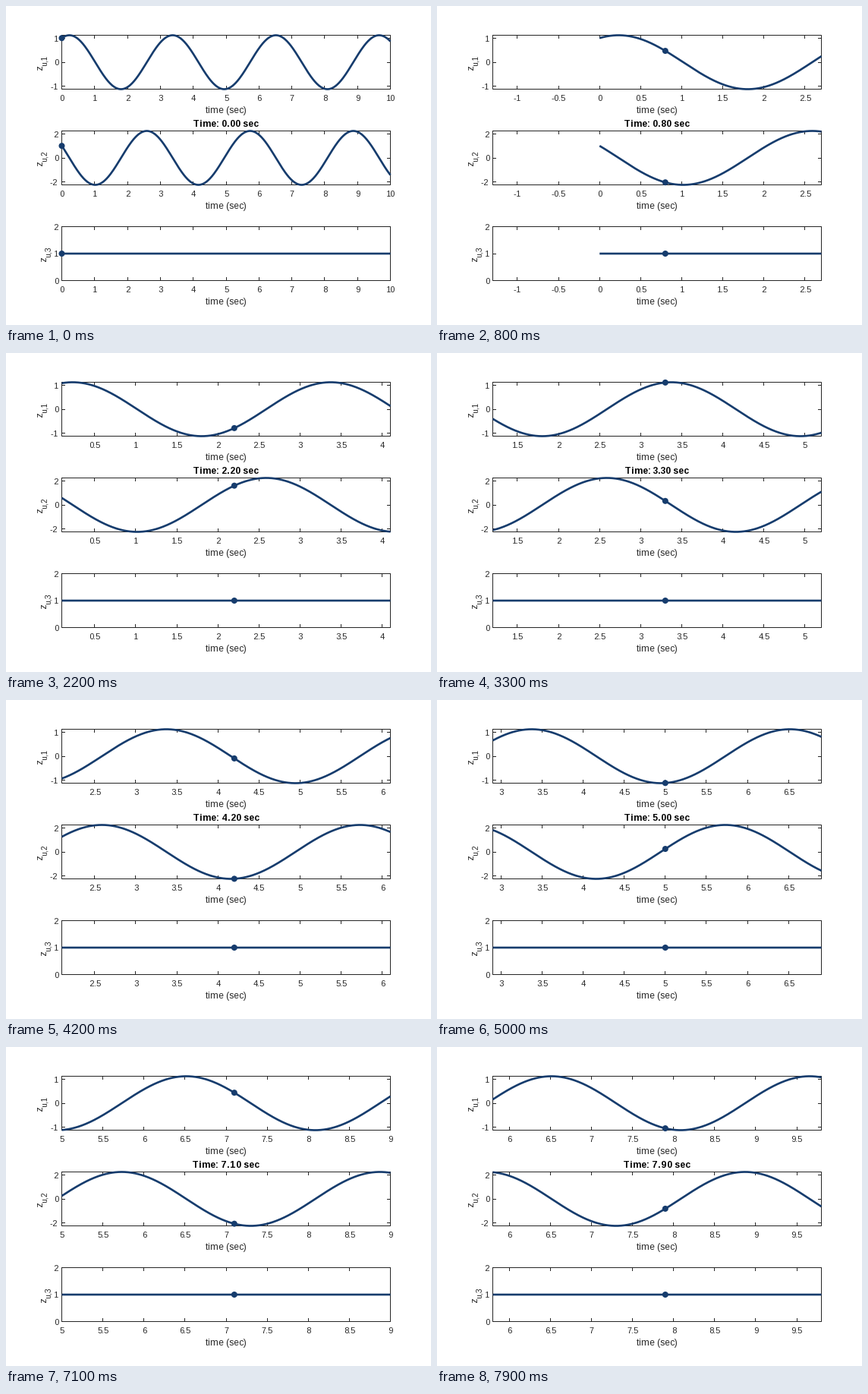
Write a matplotlib script that moves like this. It is 560 by 420 pixels and loops after 8 s.

```python
import numpy as np
import matplotlib.pyplot as plt
from matplotlib.animation import FuncAnimation
from matplotlib.patches import Circle

W, H, DPI = 560, 420, 80
PX = 72 / DPI                          # one pixel in points
LEFT, WIDE, TALL = 73.5, 433, 71       # panel geometry in pixels
RIGHT = LEFT + WIDE
NAVY, INK = "#163c6d", "#262626"
FRAMES, STEP_MS = 80, 100

plt.rcParams["font.family"] = "Liberation Sans"
plt.rcParams["text.hinting_factor"] = 1    # whole-pixel letter spacing
fig = plt.figure(figsize=(W / DPI, H / DPI), dpi=DPI, facecolor="white")
ax = fig.add_axes([0, 0, 1, 1])
ax.set_xlim(0, W)
ax.set_ylim(H, 0)
ax.axis("off")


def text(x, y, s, size, ha="center", color=INK, **kw):
    return ax.text(x, y, s, fontsize=size * PX, ha=ha, va="baseline",
                   color=color, **kw)


def stroke(xs=(), ys=(), width=1.0, color=INK, **kw):
    return ax.plot(xs, ys, color=color, lw=width * PX, clip_on=False,
                   snap=False, solid_capstyle="butt", **kw)[0]


def pixel_center(v):
    return np.floor(v) + 0.5


class Panel:
    def __init__(self, top, func, lo, hi, yticks, index, label_x):
        self.top, self.bottom = top, top + TALL
        self.func, self.lo, self.hi = func, lo, hi
        stroke([LEFT, RIGHT, RIGHT, LEFT, LEFT],
               [top, top, self.bottom, self.bottom, top],
               solid_joinstyle="miter")
        for v in yticks:
            y = self.ypix(v)
            row = pixel_center(y)
            stroke([LEFT, LEFT + 4.5], [row, row])
            stroke([RIGHT - 4.5, RIGHT], [row, row])
            text(69, y + 4.5, f"{v:g}", 11, ha="right")
        text(290, top + 102.5, "time (sec)", 12.3)
        turn = dict(ha="left", rotation=90, rotation_mode="anchor")
        text(label_x, top + 46, "z", 12.3, **turn)
        text(label_x + 5, top + 39.5, f"u,{index}", 10, **turn)

        self.ticks = stroke()
        self.labels = [text(0, top + 86.5, "", 11) for _ in range(11)]
        self.curve = stroke(width=2.67, color=NAVY, zorder=3)
        self.dot = ax.add_patch(Circle((0, 0), 4, fc=NAVY, lw=0, zorder=4))

    def ypix(self, v):
        return self.top + TALL * (self.hi - v) / (self.hi - self.lo)

    def update(self, now, x0, x1, step):
        def xpix(v):
            return LEFT + WIDE * (v - x0) / (x1 - x0)

        first = int(np.ceil(x0 / step - 1e-6))
        last = int(np.floor(x1 / step + 1e-6))
        values = [k * step for k in range(first, last + 1)]
        xs, ys = [], []
        for v in values:
            x = pixel_center(xpix(v) + 1e-6)
            xs += [x, x, np.nan] * 2
            ys += [self.top, self.top + 4.5, np.nan,
                   self.bottom - 4.5, self.bottom, np.nan]
        self.ticks.set_data(xs, ys)
        for i, label in enumerate(self.labels):
            shown = i < len(values)
            label.set_text(f"{values[i]:g}" if shown else "")
            label.set_x(xpix(values[i]) if shown else 0)

        t = np.linspace(max(x0, 0), min(x1, 10), 500)
        self.curve.set_data(xpix(t), self.ypix(self.func(t)))
        self.dot.center = xpix(now), self.ypix(self.func(now))


A = np.sqrt(1.25)
panels = [
    Panel(38.5, lambda t: np.cos(2 * t) + 0.5 * np.sin(2 * t),
          -A, A, (-1, 0, 1), 1, 48),
    Panel(164.5, lambda t: np.cos(2 * t) - 2 * np.sin(2 * t),
          -2 * A, 2 * A, (-2, 0, 2), 2, 48),
    Panel(290.5, lambda t: 1 + 0 * t, 0, 2, (0, 1, 2), 3, 53),
]
title = text(289.5, 159, "", 12.4, color="black", weight="bold")


def draw(i):
    now = i * STEP_MS / 1000
    # full span at the start, then a four-second window that follows the dot
    view = (now - 2.1, now + 1.9, 0.5) if i else (0, 10, 1)
    for p in panels:
        p.update(now, *view)
    title.set_text(f"Time: {now:.2f} sec")
    return []


anim = FuncAnimation(fig, draw, frames=FRAMES, interval=STEP_MS,
                     repeat=True, repeat_delay=0)
plt.show()
```
